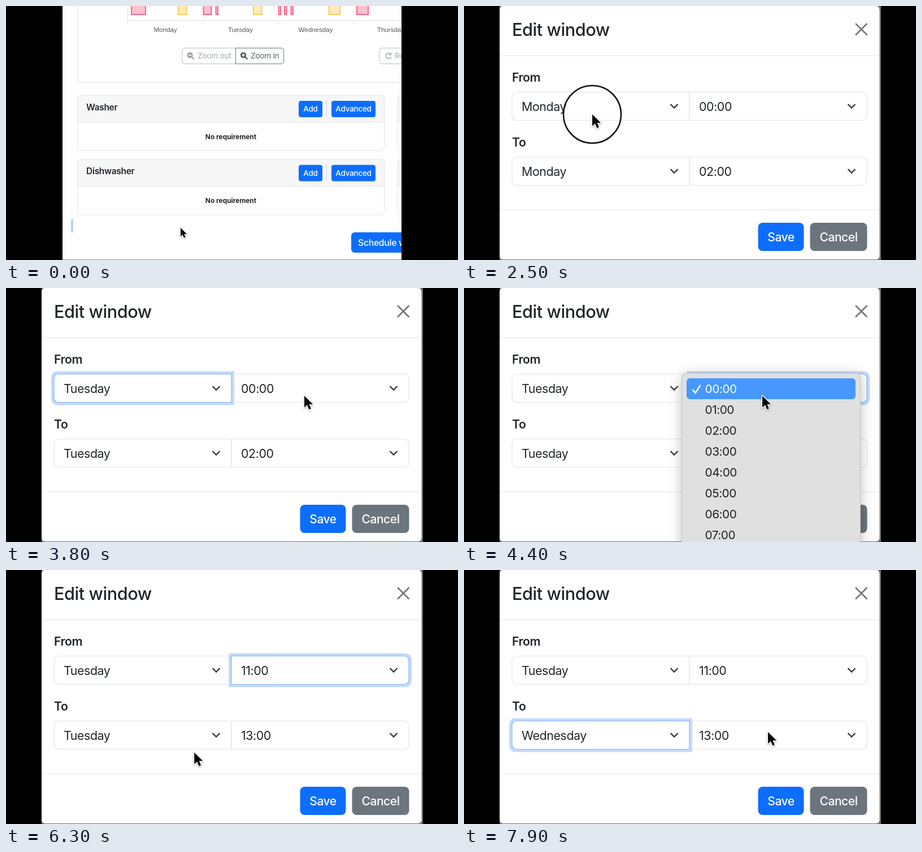
An HTML page with a canvas that plays this animation: 800 by 450 pixels, repeating every 8 s.

```html
<!DOCTYPE html>
<html lang="en">
<head>
<meta charset="utf-8">
<title>Edit requirement window</title>
<style>
html, body { margin: 0; width: 100%; height: 100%; overflow: hidden; background: #000; }
canvas { display: block; }
</style>
</head>
<body>
<canvas id="stage" width="800" height="450"></canvas>
<script>
const ctx = document.getElementById('stage').getContext('2d');
const LOOP = 8000, TICK = 100, ROW = 37.1, ZOOM = 1.37;
const BLUE = '#0d6efd', GRAY = '#6c757d', INK = '#212529', LINE = '#e1e4e8';
const DAYS = ['Monday', 'Tuesday', 'Wednesday', 'Thursday', 'Friday', 'Saturday', 'Sunday'];
const HOURS = Array.from({ length: 24 }, (_, h) => String(h).padStart(2, '0') + ':00');

// Pointer path: time, x, y
const PATH = [
  [0, 309, 393], [100, 312, 385], [700, 615, 183], [1000, 615, 183],
  [1300, 264, 170], [1900, 264, 170], [2400, 227, 192], [2800, 227, 192],
  [3100, 260, 214], [3300, 410, 206], [3700, 528, 191], [4800, 528, 191],
  [5400, 511, 415], [5900, 511, 415], [6500, 271, 291], [6700, 262, 292],
  [7100, 211, 318], [7500, 215, 328], [7600, 240, 326], [7900, 538, 287]
];
const HAND = new Path2D('M-1.7 1.5Q0-1.2 1.7 1.5V6.6Q4.2 5.8 5 7.6Q7.6 6.8 8.4 8.8Q11 8.6 11.2 11V14Q11 17 9.5 20H.4Q-1.5 16.5-5 12.2Q-6.8 9-4 9.4L-1.7 11.4Z');
const ARROW = new Path2D('M0 0V15.2L3.6 11.9L6.1 17.7L8.7 16.6L6.2 11H11Z');

const ease = u => u * u * (3 - 2 * u);
const mix = (a, b, u) => a + (b - a) * u;
const progress = (t, from, to) => ease(Math.min(1, Math.max(0, (t - from) / (to - from))));

function pointerAt(t) {
  const i = PATH.findIndex(k => k[0] > t);
  const b = i < 0 ? PATH[PATH.length - 1] : PATH[i];
  const a = i < 0 ? b : PATH[i - 1];
  const u = a === b ? 1 : progress(t, a[0], b[0]);
  return [mix(a[1], b[1], u), mix(a[2], b[2], u)];
}

// y is the middle of the capital letters
function text(s, x, y, size, { color = INK, weight = 400, align = 'left', track = -0.02, family = 'Inter, sans-serif' } = {}) {
  ctx.font = `${weight} ${size}px ${family}`;
  ctx.letterSpacing = size * track + 'px';
  ctx.textAlign = align;
  ctx.fillStyle = color;
  ctx.fillText(s, x, y + size * 0.364);
}

function box(x, y, w, h, r, fill, stroke, width = 1) {
  ctx.beginPath();
  ctx.roundRect(x, y, w, h, r);
  if (fill) { ctx.fillStyle = fill; ctx.fill(); }
  if (stroke) { ctx.strokeStyle = stroke; ctx.lineWidth = width; ctx.stroke(); }
}

function line(points, color, width = 1) {
  ctx.beginPath();
  points.forEach(([x, y]) => ctx.lineTo(x, y));
  ctx.strokeStyle = color;
  ctx.lineWidth = width;
  ctx.stroke();
}

function circle(x, y, r, color, width, from = 0, to = 7) {
  ctx.beginPath();
  ctx.arc(x, y, r, from, to);
  ctx.strokeStyle = color;
  ctx.lineWidth = width;
  ctx.stroke();
}

function button(label, x, y, w, h, size, fill = BLUE, r = 4) {
  box(x, y, w, h, r, fill);
  text(label, x + w / 2, y + h / 2, size, { color: '#fff', align: 'center', weight: 500 });
}

function magnifier(x, y, color, plus) {
  ctx.beginPath();
  ctx.arc(x, y, 5.2, 0, 7);
  ctx.fillStyle = color;
  ctx.fill();
  line([[x + 3, y + 3], [x + 7.5, y + 7.5]], color, 2.4);
  line([[x - 2.8, y], [x + 2.8, y]], '#fff', 1.5);
  if (plus) line([[x, y - 2.8], [x, y + 2.8]], '#fff', 1.5);
}

function chart() {
  box(126.5, -20, 700, 155.5, 6, '#fff', LINE);
  line([[214, 25.5], [700, 25.5]], '#e3e3e3');
  [215.5, 348.5, 481.5, 615.5].forEach(x => line([[x, x < 220 ? 0 : 25], [x, 33]], '#e3e3e3'));
  const bar = (x, w, fill, edge) => box(x + 1, -10, w - 2, 25, 0, fill, edge, 2);
  [[221, 27], [348.5, 16], [370.5, 5.5], [481.5, 5.5], [492, 5.5], [503.5, 5.5], [620, 22]]
    .forEach(([x, w]) => bar(x, w, '#ffc1cf', '#f5668b'));
  [[304, 16.5], [437, 16.5], [570.5, 21.5]]
    .forEach(([x, w]) => bar(x, w, '#ffebbb', '#fbcb5f'));
  DAYS.slice(0, 4).forEach((d, i) => text(d, 282 + i * 133, 42, 11.6,
    { color: '#555', align: 'center', track: 0, family: '"Liberation Sans", sans-serif' }));

  const off = '#a3a8ad', on = '#565e64';
  box(312, 74.5, 95, 28, [4, 0, 0, 4], '#fff', '#b9bdc1');
  box(406.5, 74.5, 85, 28, [0, 4, 4, 0], '#fff', GRAY);
  magnifier(325.5, 87, off);
  magnifier(420, 87, on, true);
  text('Zoom out', 339, 88, 13.7, { color: off });
  text('Zoom in', 433, 88, 13.7, { color: on });
  box(661.5, 74.5, 90, 28, 4, '#fff', '#b9bdc1');
  circle(677, 88.5, 4.8, off, 1.6, 0.4, 5.4);
  line([[681.5, 82.5], [681.5, 86.5], [677.5, 86.5]], off, 1.5);
  text('Reset', 688, 88, 13.7, { color: off });
}

function machine(name, y, height, advancedFill) {
  for (const [x, w] of [[126.5, 543], [693, 543]]) {
    box(x, y, w, height, 6, '#fff', LINE);
    box(x, y, w, 47, [6, 6, 0, 0], '#f7f7f8', LINE);
  }
  text(name, 142, y + 20.5, 15.5, { weight: 600 });
  button('Add', 518, y + 9.5, 42, 29, 13.5);
  line([[567.5, y + 8.5], [567.5, y + 38]], '#d0d3d6');
  button('Advanced', 576, y + 9.5, 78, 29, 13.5, advancedFill);
  text('No requirement', 398, y + 73, 11.9, { weight: 700, align: 'center', track: 0 });
}

function page(t) {
  ctx.save();
  ctx.beginPath();
  ctx.rect(100, 0, 600, 450);
  ctx.clip();
  ctx.fillStyle = '#fff';
  ctx.fillRect(100, 0, 600, 449);
  ctx.fillStyle = '#8c8c8c';
  ctx.fillRect(100, 449, 600, 1);
  chart();
  machine('Washer', 158.5, 98, t >= 700 ? '#0b5ed7' : BLUE);
  machine('Dishwasher', 272, 98, BLUE);
  ctx.fillStyle = '#b5d3fb';
  ctx.fillRect(115, 378, 4, 23);
  box(611, 401, 160, 36, 6, BLUE);
  text('Schedule weekly', 623, 419.5, 15.8, { color: '#fff', weight: 500 });
  ctx.restore();
}

function modal(title, top, bottom, saveFill) {
  ctx.fillStyle = '#6f6f6f';
  ctx.fillRect(63, 0, 675, 450);
  box(63, -1, 672.5, 450, [8, 8, 6, 6], '#fff');
  text(title, 85, top, 30.7, { weight: 500, track: -0.015 });
  line([[693, top - 11], [713.5, top + 9.5]], '#777', 2.6);
  line([[713.5, top - 11], [693, top + 9.5]], '#777', 2.6);
  line([[63, bottom - 268.5 - (361 - bottom)], [735, bottom - 268.5 - (361 - bottom)]], 'transparent');
  line([[63, top + 46], [735, top + 46]], LINE, 1.2);
  line([[63, bottom], [735, bottom]], LINE, 1.2);
  button('Save', 520.5, bottom + 23, 81, 50, 21, saveFill, 8);
  button('Cancel', 612.5, bottom + 23, 101, 50, 21, GRAY, 8);
}

function select(value, x, y, w, corners, focused) {
  if (focused) {
    const r = corners.map(c => c ? 11 : 1);
    box(x - 5, y - 5, w + 10, 60, r, '#c3d9fd');
  }
  box(x, y, w, 50, corners, '#fff', focused ? '#86b7fe' : LINE, 1.2);
  text(value, x + 17, y + 25.5, 21.4);
  const cx = x + w - 27, cy = y + 24.5;
  line([[cx - 6.5, cy - 3], [cx, cy + 3.5], [cx + 6.5, cy - 3]], '#343a40', 2.4);
}

function requirementModal(t) {
  modal('Edit requirement', 46, 356, '#6ea3fe');
  text('Valid windows', 85, 130.3, 21.6, { weight: 600 });
  text('No windows', 95, 178, 16.3, { weight: 700, track: 0 });
  button('Add window', 209, 157, 129.5, 41, 18.6, t >= 1300 ? '#0b5ed7' : BLUE, 5);
  text('Required number of cycles', 85, 236, 21.8, { weight: 600 });
  select('At least 1 cycle', 85, 263.5, 628, [8, 8, 8, 8]);
}

function menu(x, firstY, items, pointerY, checked, disabled = -1, alpha = 1) {
  const frame = [x, firstY - 27, 316, items.length * ROW + 18, 8];
  ctx.save();
  ctx.globalAlpha = alpha;
  ctx.shadowColor = 'rgba(0,0,0,.25)';
  ctx.shadowBlur = 24;
  ctx.shadowOffsetY = 4;
  box(...frame, '#e0e0e0');
  ctx.shadowColor = 'transparent';
  box(...frame, null, '#c4c4c4');
  const hot = Math.floor((pointerY - firstY + ROW / 2) / ROW);
  items.forEach((item, i) => {
    const y = firstY + i * ROW;
    const lit = i === hot && i !== disabled;
    if (lit) box(x + 8.5, y - 18, 299, 37, 6, '#4698ff');
    const color = lit ? '#fff' : i === disabled ? '#a2a2a2' : '#1f1f1f';
    text(item, x + 41, y, 20.7, { color });
    if (i === checked) line([[x + 19, y + 2], [x + 24, y + 8], [x + 33, y - 6]], color, 2.6);
  });
  ctx.restore();
}

function windowModal(t, pointerY) {
  modal('Edit window', 42, 361, BLUE);
  const tuesday = t >= 3400, eleven = t >= 5900;
  const focus = t < 2600 ? '' : t < 3900 ? 'fromDay' : t < 6700 ? 'fromHour' : 'toDay';
  const left = [8, 0, 0, 8], right = [0, 8, 8, 0];
  const fields = [
    ['fromDay', DAYS[+tuesday], 85, 152.5, left],
    ['fromHour', eleven ? '11:00' : '00:00', 399, 152.5, right],
    ['toDay', t >= 7600 ? DAYS[2] : DAYS[+tuesday], 85, 267.5, left],
    ['toHour', eleven ? '13:00' : '02:00', 399, 267.5, right]
  ];
  text('From', 85, 126.5, 21.2, { weight: 600 });
  text('To', 85, 241.3, 21.2, { weight: 600 });
  fields.sort((a, b) => (a[0] === focus) - (b[0] === focus))
    .forEach(([id, value, x, y, corners]) => select(value, x, y, 314, corners, id === focus));

  if (t >= 2700 && t < 3400) menu(70.5, 178, DAYS, pointerY, 0, -1, t >= 3300 ? 0.86 : 1);
  if (t >= 4000 && t < 5900) menu(385.5, 178 - 178 * progress(t, 4800, 5500), HOURS, pointerY, 0);
  if (t >= 6700 && t < 7600) menu(70.5, 257.5, DAYS, pointerY, 1, 0);
}

function pointer(t, x, y) {
  const scale = t < 1000 ? 1 : ZOOM;
  const clicking = [[800, 1000], [1300, 1600], [2500, 2700]].some(([a, b]) => t >= a && t < b);
  const hand = (t >= 700 && t < 1000) || (t >= 1300 && t < 1900);
  if (clicking) circle(x, y, 37.2 * scale, '#111', 1.9 * scale);
  ctx.save();
  ctx.translate(x, y);
  ctx.scale(scale, scale);
  ctx.lineJoin = 'round';
  if (hand) {
    ctx.fillStyle = '#fff';
    ctx.fill(HAND);
    ctx.strokeStyle = '#000';
    ctx.lineWidth = 1.2;
    ctx.stroke(HAND);
    [2.6, 5.2, 7.8].forEach(lx => line([[lx, 12.5], [lx, 17]], '#000', 1));
  } else {
    ctx.shadowColor = 'rgba(0,0,0,.35)';
    ctx.shadowBlur = 3;
    ctx.shadowOffsetY = 1;
    ctx.strokeStyle = '#fff';
    ctx.lineWidth = 2.2;
    ctx.stroke(ARROW);
    ctx.shadowColor = 'transparent';
    ctx.fillStyle = '#000';
    ctx.fill(ARROW);
  }
  ctx.restore();
}

const start = performance.now();
function draw() {
  const elapsed = Math.max(0, performance.now() - start) % LOOP;
  const t = Math.floor(elapsed / TICK) * TICK;
  const [x, y] = pointerAt(t);
  ctx.fillStyle = '#000';
  ctx.fillRect(0, 0, 800, 450);
  if (t < 1000) page(t);
  else if (t < 2000) requirementModal(t);
  else windowModal(t, y);
  pointer(t, x, y);
  requestAnimationFrame(draw);
}
draw();
</script>
</body>
</html>
```
